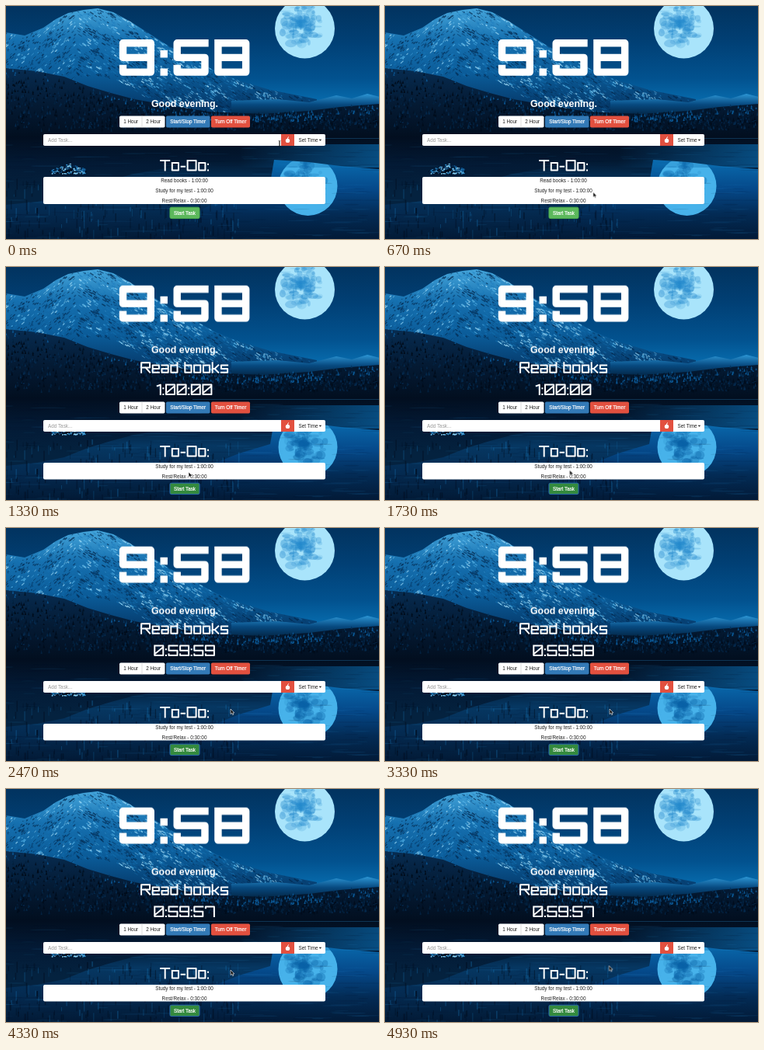
Recreate the animation shown at these times as an HTML page with a canvas. Size 480 by 300 pixels, loop 4990 ms.

```html
<!DOCTYPE html>
<html lang="en">
<head>
<meta charset="utf-8">
<title>To-do timer</title>
<style>
html, body { margin: 0; width: 100%; height: 100%; overflow: hidden; background: #03203f; }
canvas, svg { position: absolute; left: 0; top: 0; width: 480px; height: 300px; }
text { font: 6.35px "Liberation Sans", Arial, sans-serif; fill: #222; }
.mid { text-anchor: middle; }
.inv { fill: #fff; stroke: #fff; stroke-width: .2; }
.hint { fill: #999; }
.hello { font-size: 12.4px; font-weight: bold; fill: #fff; }
.lettering path { fill: none; stroke: #fff; stroke-linecap: square; stroke-linejoin: round; }
.lettering text { fill: none; }

.move { animation: move 4.99s step-end infinite; }
.before { animation: before 4.99s step-end infinite; }
.after { animation: after 4.99s step-end infinite; }
.up { --dy: -19.3px; }
.down { --dy: 32px; }
.row { --dy: 19px; }
@keyframes move { 26.65% { transform: translateY(var(--dy)); } 100% { transform: translateY(var(--dy)); } }
@keyframes before { 0% { opacity: 1; } 26.65%, 100% { opacity: 0; } }
@keyframes after { 0% { opacity: 0; } 26.65%, 100% { opacity: 1; } }

.tick { opacity: 0; animation: 4.99s step-end infinite; }
.tick0 { animation-name: tick0; }
.tick1 { animation-name: tick1; }
.tick2 { animation-name: tick2; }
.tick3 { animation-name: tick3; }
@keyframes tick0 { 26.65% { opacity: 1; } 46.69%, 100% { opacity: 0; } }
@keyframes tick1 { 46.69% { opacity: 1; } 66.73%, 100% { opacity: 0; } }
@keyframes tick2 { 66.73% { opacity: 1; } 86.77%, 100% { opacity: 0; } }
@keyframes tick3 { 86.77%, 100% { opacity: 1; } }

#start rect { animation: press 4.99s step-end infinite; }
@keyframes press {
  0% { fill: #5cb85c; stroke: #4cae4c; }
  18.5% { fill: #449d44; stroke: #398439; }
  23.5% { fill: #2c8638; stroke: #1d5f2a; }
  26.65%, 100% { fill: #348a3e; stroke: #2a6cae; }
}

#cursor { animation: point 4.99s ease-in-out infinite; }
@keyframes point {
  0%, 3% { transform: translate(352px, 177px); }
  19.5%, 26.65% { transform: translate(235px, 264px); }
  34.67% { transform: translate(237.5px, 261.5px); }
  47%, 88% { transform: translate(289px, 233px); }
  97%, 100% { transform: translate(288.3px, 227.5px); }
}
#beam { animation: beam 4.99s step-end infinite; }
#hand { opacity: 0; animation: hand 4.99s step-end infinite; }
#arrow { animation: arrow 4.99s step-end infinite; }
@keyframes beam { 0% { opacity: 1; } 6%, 100% { opacity: 0; } }
@keyframes hand { 18.5% { opacity: 1; } 26.65%, 100% { opacity: 0; } }
@keyframes arrow { 0% { opacity: 0; } 6% { opacity: 1; } 18.5% { opacity: 0; } 26.65%, 100% { opacity: 1; } }
</style>
</head>
<body>
<canvas id="scene" width="480" height="300"></canvas>
<svg viewBox="0 0 480 300">
  <g class="move up">
    <g class="lettering" data-text="9:58" data-size="65" data-weight="14.5" data-y="43"></g>
    <text class="hello mid" x="230" y="130">Good evening.</text>
  </g>

  <g class="after">
    <g class="lettering" data-text="Read books" data-y="122.3"></g>
  </g>
  <g class="tick tick0"><g class="lettering" data-text="1:00:00" data-y="150.6"></g></g>
  <g class="tick tick1"><g class="lettering" data-text="0:59:59" data-y="150.6"></g></g>
  <g class="tick tick2"><g class="lettering" data-text="0:59:58" data-y="150.6"></g></g>
  <g class="tick tick3"><g class="lettering" data-text="0:59:57" data-y="150.6"></g></g>

  <g class="move down">
    <rect x="146" y="141.5" width="58.5" height="15" rx="1.8" fill="#fff"/>
    <path d="M175 141.5v15" stroke="#ccc" stroke-width=".6"/>
    <text class="mid" x="160.7" y="151.2">1 Hour</text>
    <text class="mid" x="189.7" y="151.2">2 Hour</text>
    <rect x="206" y="141.5" width="56.5" height="15" rx="1.8" fill="#337ab7"/>
    <text class="mid inv" x="234.2" y="151.2">Start/Stop Timer</text>
    <rect x="264" y="141.5" width="50" height="15" rx="1.8" fill="#e2503f"/>
    <text class="mid inv" x="289" y="151.2">Turn Off Timer</text>

    <rect x="48" y="165" width="363" height="15" rx="1.8" fill="#fff"/>
    <text class="hint" x="54" y="174.7">Add Task...</text>
    <rect x="354" y="165" width="17" height="15" fill="#e2503f"/>
    <circle cx="362.5" cy="173.4" r="2.7" fill="#fff"/>
    <path d="M362.4 171q0-2 1.6-2.4" fill="none" stroke="#fff" stroke-width="1"/>
    <text x="376.5" y="174.7">Set Time</text>
    <path d="M402.6 171.8h3.6l-1.8 1.9z" fill="#222"/>

    <g class="lettering" data-text="To-Do:" data-y="198"></g>
  </g>

  <rect class="before" x="48" y="220" width="363" height="35" rx="2" fill="#fff"/>
  <rect class="after" x="48" y="252" width="363" height="21.5" rx="2" fill="#fff"/>
  <text class="before mid" x="229.5" y="226.7">Read books - 1:00:00</text>
  <g class="move row">
    <text class="mid" x="229.5" y="239.8">Study for my test - 1:00:00</text>
    <text class="mid" x="229.5" y="252.6">Rest/Relax - 0:30:00</text>
    <g id="start">
      <rect x="211" y="259.2" width="38" height="14.4" rx="1.8"/>
      <text class="mid inv" x="230" y="268.7">Start Task</text>
    </g>
  </g>

  <g id="cursor">
    <path id="beam" d="M-1.3-3.5Q0-3.5 0-2.5V2.5Q0 3.5-1.3 3.5M1.3-3.5Q0-3.5 0-2.5V2.5Q0 3.5 1.3 3.5" fill="none" stroke="#111" stroke-width=".7"/>
    <path id="arrow" d="M0 0V6.6L1.6 5.3 2.7 7.6 3.8 7.1 2.8 4.9H4.8Z" fill="#111" stroke="#fff" stroke-width=".6"/>
    <path id="hand" d="M-.7 0Q0-.8.7 0V2.6L3 3.2Q3.6 3.4 3.4 4.4L2.8 7H-1.2L-3 4.4Q-2.8 3.4-1.8 3.8L-.7 4.6Z" fill="#fff" stroke="#111" stroke-width=".6"/>
  </g>
</svg>
<script>
// Wide display lettering: [width, strokes], each point is xy on an 8 by 8 grid.
const GLYPHS = {
  0: [55, '00 80 88 08 00;07 81'], 1: [20, '01 80 88'], 5: [55, '80 00 04 84 88 08 07'],
  7: [55, '01 00 80 88'], 8: [55, '00 80 88 08 00;04 84'], 9: [55, '84 04 00 80 88 08 07'],
  ':': [0, '03 03;08 08'], '-': [22, '05 85'],
  T: [55, '00 80;40 48'], D: [55, '00 80 88 08 00'], R: [55, '08 00 80 84 04;44 88'],
  a: [41, '02 82 88 08 05 85'], b: [41, '00 08 88 82 02'], d: [41, '80 88 08 02 82'],
  e: [41, '88 08 02 82 85 05'], k: [38, '00 08;05 35 82;35 88'],
  o: [41, '02 82 88 08 02'], s: [41, '82 02 05 85 88 08']
};
const CAP = 72, SPACE = 31;

function letter(g) {
  const { text, size = 20, weight = 10, y } = g.dataset;
  const t = +weight, h = CAP - t, gap = t * .8;
  let x = 0, d = '';
  for (const ch of text) {
    if (ch === ' ') { x += SPACE; continue; }
    const [w, strokes] = GLYPHS[ch];
    for (const line of strokes.split(';')) {
      d += 'M' + line.split(' ').map(p =>
        `${x + t / 2 + p[0] / 8 * w} ${t / 2 + p[1] / 8 * h}`).join('L');
    }
    x += w + t + gap;
  }
  const k = size / 100, left = 229.6 - (x - gap) * k / 2;
  g.innerHTML = `<text class="mid" x="230" y="${+y + CAP * k}">${text}</text>` +
    `<path d="${d}" stroke-width="${t}" transform="translate(${left} ${y}) scale(${k})"/>`;
}
document.querySelectorAll('.lettering').forEach(letter);

// Night lake backdrop
const c = document.getElementById('scene').getContext('2d');
const SHORE = 168;
let seed = 11;
const rnd = (a = 0, b = 1) => {
  seed = (seed * 16807) % 2147483647;
  return a + (b - a) * seed / 2147483647;
};
const pick = list => list[Math.floor(rnd(0, list.length))];
const mirror = points => points.map(([x, y]) => [x, 2 * SHORE - y]);

function fade(x0, y0, x1, y1, ...colors) {
  const g = c.createLinearGradient(x0, y0, x1, y1);
  colors.forEach((col, i) => g.addColorStop(i / (colors.length - 1), col));
  return g;
}
function shape(points, fill) {
  c.beginPath();
  points.forEach(p => c.lineTo(...p));
  c.closePath();
  c.fillStyle = fill;
  c.fill();
}
function oval(x, y, rx, ry, fill) {
  c.beginPath();
  c.ellipse(x, y, rx, ry, 0, 0, 7);
  c.fillStyle = fill;
  c.fill();
}
function streak(x, y, dx, dy, width, color) {
  c.strokeStyle = color;
  c.lineWidth = width;
  c.beginPath();
  c.moveTo(x, y);
  c.lineTo(x + dx, y + dy);
  c.stroke();
}
function edge(points, x) {
  const i = Math.max(1, points.findIndex(p => p[0] >= x));
  const [a, b] = [points[i - 1], points[i]];
  return a[1] + (b[1] - a[1]) * (x - a[0]) / (b[0] - a[0]);
}
function moon(x, y, r, light, dark) {
  c.save();
  oval(x, y, r, r, light);
  c.clip();
  for (let i = 0; i < 110; i++) {
    const a = rnd(0, 6.3), q = rnd(0, r * .72);
    c.globalAlpha = rnd(.1, .4);
    oval(x - 5 + q * Math.cos(a), y - 5 + q * Math.sin(a), rnd(1, 8), rnd(1, 6), dark);
  }
  c.restore();
}

c.fillStyle = fade(0, 0, 0, 140, '#02335f', '#014075', '#02528f', '#0a79bd');
c.fillRect(0, 0, 480, SHORE);
moon(384.5, 29, 38.5, '#a9e4fb', '#2488cb');

const ridge = [[0, 34], [24, 38], [48, 28], [64, 17], [80, 9], [100, 5], [118, 3], [138, 8], [160, 20],
  [185, 36], [210, 52], [240, 67], [270, 84], [300, 96], [340, 108], [400, 120]];
c.save();
shape([...ridge, [400, SHORE], [0, SHORE]], fade(0, 0, 0, 130, '#48a9de', '#1670af', '#0b5c99', '#05396a'));
c.clip();
for (let i = 0; i < 3200; i++) {
  const x = rnd(0, 400), depth = rnd() * 85, len = rnd(1, 5);
  const lit = Math.sin(x * .13 + depth * .16) + Math.sin(x * .05 - depth * .23) + rnd(-1, 1) + (x > 170 ? .5 : 0);
  const color = lit > 1 ? pick(['#a5e0f9b0', '#55b4e8b0']) : lit > -.2 ? '#1878b970' : pick(['#04284cb0', '#063b6ca0']);
  streak(x, edge(ridge, x) + depth, (x < 90 ? -.7 : 1) * len, len * .65, rnd(.5, 1.7), color);
}
c.restore();

const hill = [[290, 122], [350, 120], [390, 124], [425, 115], [445, 119], [465, 113], [481, 117]];
shape([...hill, [481, SHORE], [290, SHORE]], fade(0, 112, 0, 142, '#2f9bdb', '#07497f', '#03223f'));
const woods = [[0, 80], [40, 84], [75, 91], [105, 103], [135, 112], [165, 120], [210, 128], [260, 136],
  [330, 139], [390, 135], [430, 130], [481, 126]];
shape([...woods, [481, SHORE + 3], [0, SHORE + 3]], fade(0, 80, 0, SHORE, '#072c51', '#041b35', '#020f20'));
for (let i = 0; i < 1500; i++) {
  const x = rnd(0, 480), top = edge(woods, x), y = top + rnd(-3, 1) + rnd() * (157 - top), h = rnd(2, 6);
  const near = y - top < 9;
  shape([[x, y], [x + 1.2, y + h], [x - 1.2, y + h]],
    pick(near ? ['#021427', '#06335c', '#0b5590'] : ['#010c1b', '#021327', '#05294c', '#03203d']));
}

// Sky, slope and woods mirrored in the water
c.fillStyle = fade(0, 170, 0, 300, '#0a72b8', '#0967aa', '#05498a', '#032b55', '#021a37');
c.fillRect(0, SHORE, 480, 132);
moon(388.5, 232, 38, '#47b2ea', '#0b62a6');
shape(mirror([[0, SHORE], ...ridge.slice(0, -1), [350, SHORE]]), fade(0, 195, 0, 300, '#02142a', '#063762', '#042a50', '#021a36'));
shape(mirror([[0, SHORE], ...woods, [481, SHORE]]), fade(0, SHORE, 0, 240, '#020e1f', '#031a35', '#04223f'));
c.fillStyle = fade(300, 0, 480, 0, '#0a6cb000', '#0a6cb0a0');
c.fillRect(300, 178, 180, 30);
for (let i = 0; i < 260; i++) {
  const x = rnd(0, 300), y = rnd(222, 300);
  streak(x, y, 0, rnd(3, 14), rnd(.6, 2), pick(['#1c86cc45', '#010d1e80', '#010d1e60']));
}
for (let i = 0; i < 240; i++) {
  const x = rnd(-20, 480), y = rnd(176, 300);
  oval(x, y, rnd(6, 26), rnd(.3, .8), pick(['#2a8fd41c', '#01122b28']));
}
c.fillStyle = '#2f8cc870';
c.fillRect(240, SHORE + 2, 240, .7);

oval(80, 213, 24, 4, '#010d1e');
for (let i = 0; i < 220; i++) {
  const x = rnd(58, 102), top = 203 + Math.abs(x - 82) * .36;
  oval(x, rnd(top, 216), rnd(.5, 1.6), rnd(.4, 1), pick(['#8cd0f2', '#3496d4', '#04203f', '#0b4f88']));
}
</script>
</body>
</html>
```
